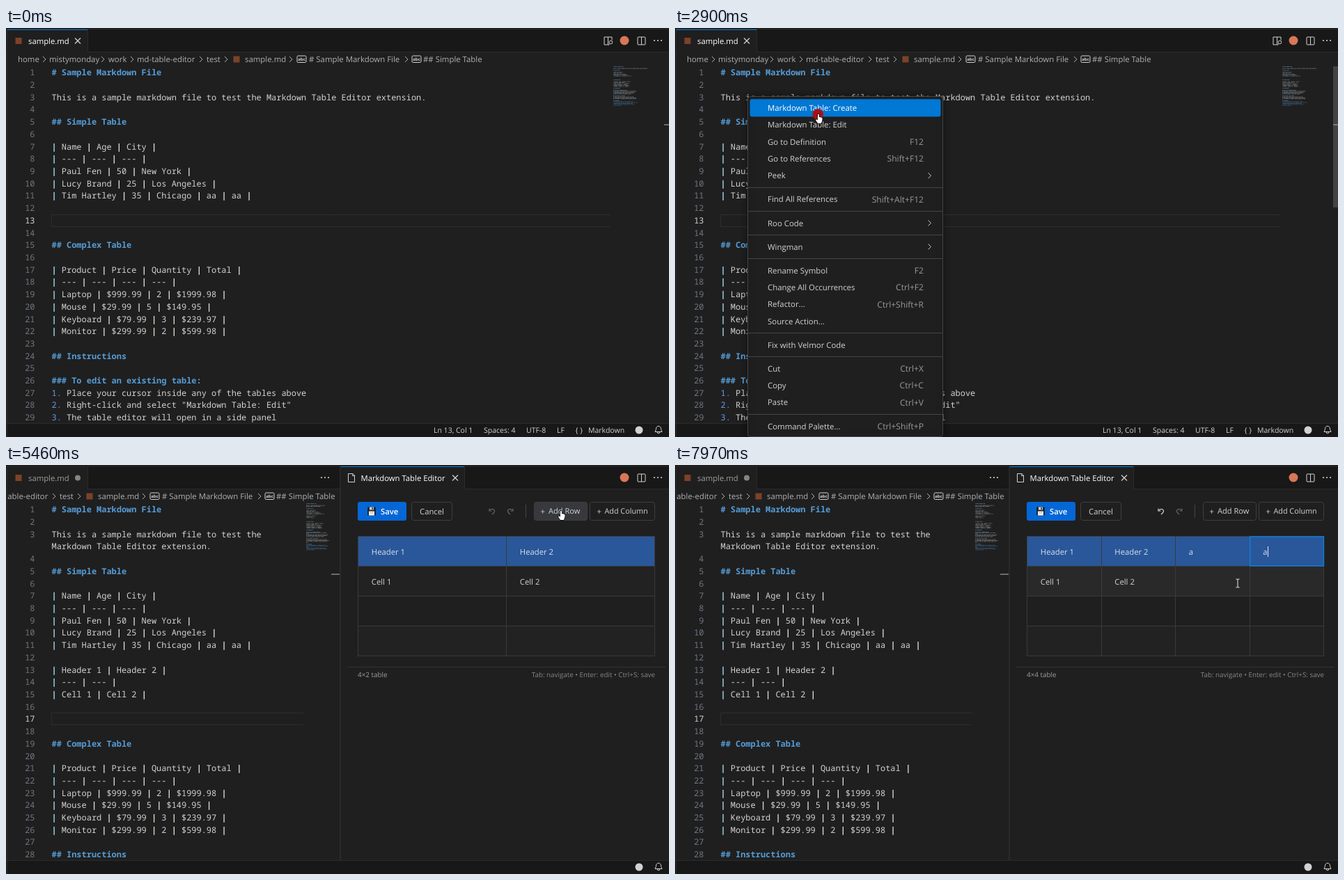
Write an HTML page with a canvas that moves like this. It is 952x588 px and loops after 8 s.

```html
<!DOCTYPE html>
<html lang="en">
<head>
<meta charset="utf-8">
<title>Markdown table editor</title>
<style>
html, body { margin: 0; width: 100%; height: 100%; overflow: hidden; background: #1f1f1f; }
canvas { display: block; }
</style>
</head>
<body>
<canvas id="stage" width="952" height="588"></canvas>
<script>
const W = 952, H = 588, LOOP = 8000;
const ctx = document.getElementById('stage').getContext('2d', { alpha: false });
const UI = '"Open Sans", "Noto Sans", sans-serif';
const MONO = '"Noto Sans Mono", "DejaVu Sans Mono", monospace';
const BG = '#1f1f1f', BAR = '#181818', LINE = '#2b2b2b', FG = '#d2d2d2', DIM = '#9d9d9d';
const CHAR = 7.18, ROW = 17.71, CODE_X = 65.5;

// moments of the story
const T = { enter: 930, press: 1950, menu: 2080, pick: 2900, menuOff: 2980, insert: 3030,
  split: 3100, load: 3310, crumbs: 3630, rows: [5190, 5460], cols: [5950, 6150],
  focus3: 7090, type3: 7360, focus4: 7560, type4: 7760 };
const clicks = [[T.press, T.menu], [T.pick, T.menuOff],
  ...[5130, 5400, 5890, 6090, T.focus3].map(t => [t, t + 60])];

const path = [[930, 54, 545], [1130, 60, 440], [1330, 84, 335], [1530, 101, 284], [1670, 104, 277],
  [1750, 104.5, 277], [2350, 104.5, 277], [2420, 112, 265], [2490, 129, 246], [2620, 180, 160],
  [2700, 202, 130], [2760, 206, 124], [3560, 206, 124], [3640, 330, 175], [3740, 540, 238],
  [3830, 588, 253], [4040, 588, 253], [4200, 604, 215], [4380, 662, 140], [4560, 810, 112],
  [4680, 848, 98], [4800, 830, 88], [4900, 805, 68], [5000, 797, 66], [5560, 797, 66],
  [5700, 832, 68], [5820, 857, 66], [6340, 857, 66], [6480, 835, 100], [6680, 793, 156],
  [6850, 796, 150], [7040, 800, 141], [7830, 800, 141], [7900, 804, 160], [7970, 808, 170]];

const doc = `# Sample Markdown File

This is a sample markdown file to test the Markdown Table Editor extension.

## Simple Table

| Name | Age | City |
| --- | --- | --- |
| Paul Fen | 50 | New York |
| Lucy Brand | 25 | Los Angeles |
| Tim Hartley | 35 | Chicago | aa | aa |



## Complex Table

| Product | Price | Quantity | Total |
| --- | --- | --- | --- |
| Laptop | $999.99 | 2 | $1999.98 |
| Mouse | $29.99 | 5 | $149.95 |
| Keyboard | $79.99 | 3 | $239.97 |
| Monitor | $299.99 | 2 | $599.98 |

## Instructions

### To edit an existing table:
1. Place your cursor inside any of the tables above
2. Right-click and select "Markdown Table: Edit"
3. The table editor will open in a side panel
4. Edit the cells and save your changes

### To create a new table:
1. Place your cursor where you want the table
2. Right-click and select "Markdown Table: Create"
3. A new table is inserted and the editor will open

### Features:
- Edit cells directly in a simple table view
- Add and remove the rows or columns of any table here
- Navigate with Tab and Enter between cells
- Undo and redo every change made to the table
- Save with Ctrl+S`.split('\n');
const added = ['| Header 1 | Header 2 |', '| --- | --- |', '| Cell 1 | Cell 2 |', ''];
const docNew = [...doc.slice(0, 12), ...added, ...doc.slice(12)];

const menu = [['Markdown Table: Create'], ['Markdown Table: Edit'], ['Go to Definition', 'F12'],
  ['Go to References', 'Shift+F12'], ['Peek', '>'], 0, ['Find All References', 'Shift+Alt+F12'], 0,
  ['Roo Code', '>'], 0, ['Wingman', '>'], 0, ['Rename Symbol', 'F2'],
  ['Change All Occurrences', 'Ctrl+F2'], ['Refactor...', 'Ctrl+Shift+R'], ['Source Action...'], 0,
  ['Fix with Velmor Code'], 0, ['Cut', 'Ctrl+X'], ['Copy', 'Ctrl+C'], ['Paste', 'Ctrl+V'], 0,
  ['Command Palette...', 'Ctrl+Shift+P']];

function rect(x, y, w, h, color) {
  ctx.fillStyle = color;
  ctx.fillRect(x, y, w, h);
}
function box(x, y, w, h, r, fill, stroke) {
  ctx.beginPath();
  ctx.roundRect(x, y, w, h, r);
  if (fill) { ctx.fillStyle = fill; ctx.fill(); }
  if (stroke) { ctx.strokeStyle = stroke; ctx.lineWidth = 1; ctx.stroke(); }
}
function line(color, width, ...pts) {
  ctx.beginPath();
  for (let i = 0; i < pts.length; i += 2) ctx.lineTo(pts[i], pts[i + 1]);
  ctx.strokeStyle = color;
  ctx.lineWidth = width;
  ctx.stroke();
}
function disc(x, y, r, color) {
  ctx.beginPath();
  ctx.arc(x, y, r, 0, 7);
  ctx.fillStyle = color;
  ctx.fill();
}
// y is the middle of the capitals
function text(s, x, y, color = FG, size = 11.3, align = 'left', font = UI, weight = 400) {
  ctx.font = `${weight} ${size}px ${font}`;
  ctx.textAlign = align;
  ctx.fillStyle = color;
  ctx.fillText(s, x, Math.round(y + size * 0.36));
}
function clip(x, y, w, h, draw) {
  ctx.save();
  ctx.beginPath();
  ctx.rect(x, y, w, h);
  ctx.clip();
  draw();
  ctx.restore();
}
const chevron = (x, y, color) => line(color, 1, x - 2, y - 4, x + 2, y, x - 2, y + 4);
const cross = (x, y) => { line(FG, 1.2, x - 4, y - 4, x + 4, y + 4); line(FG, 1.2, x + 4, y - 4, x - 4, y + 4); };
const dots = (x, y) => [-5, 0, 5].forEach(d => disc(x + d, y, 1.1, FG));
const mdIcon = (x, y) => rect(x - 4.5, y - 4.5, 9, 9, '#7d4228');
const span = (t, a, b) => Math.min(1, Math.max(0, (t - a) / (b - a)));

function splitIcon(x, y) {
  box(x - 5.5, y - 5.5, 11, 11, 1, null, FG);
  line(FG, 1, x, y - 5.5, x, y + 5.5);
}
function previewIcon(x, y) {
  line(FG, 1, x, y + 5.5, x - 5.5, y + 5.5, x - 5.5, y - 5.5, x + 5.5, y - 5.5, x + 5.5, y - 1);
  line(FG, 1, x, y - 5.5, x, y + 5.5);
  ctx.beginPath();
  ctx.arc(x + 4, y + 2, 2.3, 0, 7);
  ctx.stroke();
  line(FG, 1, x + 2.5, y + 4, x + 0.5, y + 6.5);
}
function bell(x, y) {
  ctx.beginPath();
  ctx.moveTo(x - 5, y + 3);
  ctx.lineTo(x - 3.7, y);
  ctx.bezierCurveTo(x - 4, y - 7, x + 4, y - 7, x + 3.7, y);
  ctx.lineTo(x + 5, y + 3);
  ctx.closePath();
  ctx.strokeStyle = FG;
  ctx.lineWidth = 1;
  ctx.stroke();
  ctx.beginPath();
  ctx.arc(x, y + 3.5, 1.8, 0, Math.PI);
  ctx.stroke();
}
function abcIcon(x, y) {
  box(x - 6.5, y - 5, 13, 9.5, 1.5, null, FG);
  text('abc', x, y, FG, 6, 'center', UI, 700);
}
function turnIcon(x, y, dir, color) {
  ctx.save();
  ctx.translate(x, y);
  ctx.scale(dir, 1);
  line(color, 1.1, -4, -4, -4, -0.5, -0.5, -0.5);
  ctx.beginPath();
  ctx.moveTo(-4, -0.5);
  ctx.bezierCurveTo(-1, -5, 4, -3, 3.5, 0.5);
  ctx.quadraticCurveTo(3, 2, 0, 4.5);
  ctx.stroke();
  ctx.restore();
}

// lines broken at spaces to fit the pane
function wrap(lines, cols) {
  const rows = [];
  lines.forEach((s, i) => {
    let n = i + 1;
    while (s.length > cols) {
      const cut = s.lastIndexOf(' ', cols);
      rows.push({ s: s.slice(0, cut), n });
      s = s.slice(cut + 1);
      n = 0;
    }
    rows.push({ s, n });
  });
  return rows;
}

function codeRow(s, y) {
  const put = (part, col, color, weight) =>
    text(part, CODE_X + col * CHAR, y, color, CHAR / 0.6, 'left', MONO, weight);
  if (s[0] === '#') return put(s, 0, '#569cd6', 700);
  const mark = (/^(\d\.|-)/.exec(s) || [''])[0];
  if (mark) put(mark, 0, '#6796e6', 500);
  put(s.slice(mark.length).replaceAll('|', ' '), mark.length, FG, 500);
  for (const { index } of s.matchAll(/\|/g)) put('|', index, index ? '#dedbd0' : '#a8def8', 700);
}

function minimap(rows, x) {
  rows.forEach(({ s }, i) => {
    const color = s[0] === '#' || s[0] === '-' ? '#569cd6' : FG;
    ctx.globalAlpha = s[0] === '#' ? 0.6 : 0.42;
    for (const m of s.matchAll(/\S+/g))
      rect(x + m.index * 0.65, 55 + i * 1.36, m[0].length * 0.65, 0.9, color);
  });
  ctx.globalAlpha = 1;
}

function breadcrumbs(shift) {
  const y = 45, c = '#b0b0b0';
  ctx.save();
  ctx.translate(-shift, 0);
  [['home', 17], ['mistymonday', 62], ['work', 147], ['md-table-editor', 188], ['test', 288],
    ['sample.md', 343], ['# Sample Markdown File', 435], ['## Simple Table', 599]]
    .forEach(([s, x]) => text(s, x, y, c, 11.4));
  [55, 139, 181, 280, 316, 409, 575].forEach(x => chevron(x, y, c));
  mdIcon(331, y);
  abcIcon(424.5, y);
  abcIcon(589.5, y);
  ctx.restore();
}

function editor(t) {
  const split = t >= T.split, changed = t >= T.insert;
  const right = split ? 479 : W, edge = split ? 427 : 868, active = changed ? 17 : 13;
  const rows = wrap(changed ? docNew : doc, split ? 50 : 100);
  clip(2, 36, right - 2, 20, () => breadcrumbs(t >= T.crumbs ? 211 : 0));
  clip(0, 54, right, 514, () => {
    rows.slice(0, 30).forEach(({ s, n }, i) => {
      const y = 64 + i * ROW;
      if (n === active) {
        const top = Math.round(y - 9) + 0.5;
        line('#2e2e2e', 1, edge, top, 65.5, top, 65.5, top + 17, edge, top + 17);
      }
      if (n) text(n, 41.5, y, n === active ? FG : '#6e7681', CHAR / 0.6, 'right', MONO);
      codeRow(s, y);
    });
  });
  minimap(rows, split ? 431 : 872);
  // scrollbar and overview mark
  const bar = split ? 467 : 945, barH = split ? 174 : 203;
  let show = span(t, T.enter, T.enter + 150);
  if (t > 3600) show = t < 3850 ? 1 - 0.88 * span(t, 3600, 3850) : 0.12 * (1 - span(t, 4300, 4800));
  ctx.globalAlpha = show;
  rect(bar, 55, right - bar, barH, '#434343');
  ctx.globalAlpha = 1;
  rect(bar, split ? 156.5 : 138.5, right - bar, 1.2, '#a0a0a0');
}

function chrome(t) {
  const split = t >= T.split;
  rect(0, 0, W, 35, BAR);
  rect(0, 34, W, 1, LINE);
  rect(2, 2, 115, 33, BG);
  rect(117, 2, 1, 33, LINE);
  rect(1, 1, W, 1, LINE);
  if (!split) rect(2, 2, 115, 1, '#0078d4');
  mdIcon(18, 18.5);
  text('sample.md', 32, 18.5, split ? DIM : '#ffffff');
  if (t >= T.insert) disc(103, 18.5, 4, split ? '#858585' : FG);
  else cross(103, 18.5);
  if (split) {
    dots(458, 18);
    rect(481, 2, 177, 33, BG);
    rect(481, 2, 177, 1, '#0078d4');
    rect(658, 2, 1, 33, LINE);
    line(FG, 1, 498, 12.5, 491.5, 12.5, 491.5, 24.5, 500.5, 24.5, 500.5, 15, 498, 12.5, 497.5, 15.5, 500.5, 15.5);
    text('Markdown Table Editor', 509.5, 18.5, '#ffffff');
    cross(645, 18.5);
    rect(479.5, 2, 1.2, 566, '#333333');
  } else previewIcon(864.5, 18.5);
  disc(888, 18, 6.5, '#d97757');
  splitIcon(912.5, 18.5);
  dots(936, 18);
  rect(0, 568, W, 20, BAR);
  rect(0, 568, W, 1, LINE);
  rect(1, 1, 1, 587, LINE);
  if (!split) {
    const col = t >= T.insert ? 'Ln 17, Col 1' : 'Ln 13, Col 1';
    [[col, 614], ['Spaces: 4', 686], ['UTF-8', 747], ['LF', 791], ['{ }', 817.5], ['Markdown', 836]]
      .forEach(([s, x]) => text(s, x, 578.5, FG, 10.5));
  }
  disc(909, 578, 5.5, FG);
  bell(937, 577.5);
}

function floppy(x, y) {
  box(x, y, 12, 12, 1, '#20242c');
  rect(x + 3, y, 6, 4, '#c9d4e4');
  rect(x + 6.5, y + 0.7, 1.5, 2.6, '#20242c');
  rect(x + 2, y + 6, 8, 6, '#f2f2f2');
  rect(x + 3, y + 8, 6, 0.8, '#9aa4b2');
}

function panel(t, m) {
  const count = list => 2 + list.filter(at => t >= at).length;
  const nr = count(T.rows), nc = count(T.cols);
  const over = (x, w) => m && m.y > 53 && m.y < 80 && m.x > x && m.x < x + w;
  const button = (x, w) => box(x + 0.5, 53.5, w - 1, 26, 3, over(x, w) ? '#37393d' : null, '#3f3f3f');
  box(505, 53, 70, 27, 3, '#0567d6');
  floppy(519, 60.5);
  text('Save', 538, 66.5, '#ffffff', 11.3, 'left', UI, 600);
  button(582, 59);
  text('Cancel', 594, 66.5);
  button(758, 77);
  text('+', 767.5, 66.5);
  text('Add Row', 779, 66.5, FG, 11.1);
  button(838, 94);
  text('+', 848.5, 66.5);
  text('Add Column', 859.5, 66.5, FG, 10.8);
  turnIcon(698, 66.5, 1, t >= T.type3 ? FG : '#666666');
  turnIcon(724, 66.5, -1, '#666666');
  rect(746, 57, 1, 19, '#454545');

  const x0 = 505.5, y0 = 102.5, cw = 426 / nc, rh = 43, bottom = y0 + nr * rh;
  const hover = m && m.x > x0 && m.x < 931 ? Math.floor((m.y - y0) / rh) : -1;
  for (let r = 0; r < nr; r++) {
    const fill = r === 0 ? '#2a579a' : r === hover ? '#292929' : r % 2 ? '#222222' : BG;
    rect(x0, y0 + r * rh, 426, rh, fill);
  }
  for (let r = 0; r <= nr; r++) line('#3a3a3a', 1, x0, y0 + r * rh, 931.5, y0 + r * rh);
  for (let c = 0; c <= nc; c++) {
    const x = Math.round(x0 + c * cw - 0.5) + 0.5;
    line('#3a3a3a', 1, x, y0, x, bottom);
  }
  const cellX = c => x0 + c * cw + 19.3;
  const head = ['Header 1', 'Header 2', t >= T.type3 ? 'a' : '', t >= T.type4 ? 'a' : ''];
  head.slice(0, nc).forEach((s, c) => text(s, cellX(c), 125, '#d8dfea'));
  text('Cell 1', cellX(0), 167.5);
  text('Cell 2', cellX(1), 167.5);

  // focused header cell with a blinking caret
  const [at, cell] = t >= T.focus4 ? [T.type4, 3] : t >= T.focus3 ? [T.type3, 2]
    : t < 5130 ? [T.load, 0] : [0, -1];
  if (cell >= 0) {
    const x = Math.round(x0 + cell * cw - 0.5);
    ctx.strokeStyle = '#0a84e0';
    ctx.lineWidth = 1.3;
    ctx.strokeRect(x + 0.7, 102.9, cw - 0.7, 42.2);
    if (t < at || Math.floor((t - at) / 500) % 2 === 0) {
      ctx.font = `11.3px ${UI}`;
      rect(Math.round(cellX(cell) + ctx.measureText(head[cell]).width), 117, 1, 15, '#e6e6e6');
    }
  }
  rect(490, bottom + 15.5, 457, 1, '#333333');
  text(`${nr}×${nc} table`, 505, bottom + 27, DIM, 9.9);
  text('Tab: navigate • Enter: edit • Ctrl+S: save', 932, bottom + 27, '#858585', 9.8, 'right');
}

function contextMenu(m) {
  ctx.save();
  ctx.shadowColor = 'rgba(0,0,0,0.45)';
  ctx.shadowBlur = 8;
  box(104.5, 98.5, 280, 489, 4, BG, '#454545');
  ctx.restore();
  let y = 115;
  menu.forEach(item => {
    if (!item) {
      rect(105, Math.floor(y - 7.3), 279, 1, '#454545');
      y += 9.8;
      return;
    }
    const [label, key] = item;
    const on = m.x > 108 && Math.abs(m.y - y) < 12.2;
    if (on) box(107.5, y - 12.8, 274, 25.4, 3, '#0078d4');
    text(label, 133, y, on ? '#ffffff' : FG, 11.4);
    if (key === '>') chevron(365.5, y, FG);
    else if (key) text(key, 357, y, on ? '#ffffff' : '#999999', 12.1, 'right');
    y += 24.3;
  });
}

function mouseAt(t) {
  if (t < T.enter) return null;
  const i = path.findIndex(p => p[0] > t);
  if (i < 0) return { x: 808, y: 170 };
  const [ta, xa, ya] = path[i - 1], [tb, xb, yb] = path[i], k = (t - ta) / (tb - ta);
  return { x: xa + (xb - xa) * k, y: ya + (yb - ya) * k };
}

function cursorKind(t, { x, y }) {
  if (t >= T.menu && t < T.menuOff) return 'hand';
  if (t < T.pick) return x > 62 ? 'beam' : 'arrow';
  if (x < 480) return t > 3560 && x < 427 ? 'beam' : 'arrow';
  if (y < 80 && y > 53 && x > 758) return 'hand';
  return y > 146 && y < 188 ? 'beam' : 'arrow';
}

function shape(pts) {
  ctx.beginPath();
  for (let i = 0; i < pts.length; i += 2) ctx.lineTo(pts[i], pts[i + 1]);
  ctx.closePath();
  ctx.strokeStyle = '#000000';
  ctx.lineWidth = 1.4;
  ctx.stroke();
  ctx.fillStyle = '#ffffff';
  ctx.fill();
}

function pointer(t, m) {
  if (clicks.some(([a, b]) => t >= a && t < b)) disc(m.x - 0.8, m.y, 7.8, '#aa1016');
  ctx.save();
  ctx.translate(m.x, m.y);
  const kind = cursorKind(t, m);
  if (kind === 'beam') {
    line('#e8e8e8', 1, 0, -5, 0, 5);
    line('#e8e8e8', 1, -2.5, -6, -0.7, -6, 0, -5, 0.7, -6, 2.5, -6);
    line('#e8e8e8', 1, -2.5, 6, -0.7, 6, 0, 5, 0.7, 6, 2.5, 6);
  } else if (kind === 'hand') {
    shape([-1, 0, 0.8, 0, 1, 4, 4, 4.6, 5.6, 5.6, 5.4, 9, 4, 13, -1, 13, -4, 8.5, -3.4, 7.2, -1.2, 8.5]);
  } else {
    shape([0, 0, 0, 10, 2.3, 8, 3.8, 11.4, 5.3, 10.7, 3.9, 7.4, 7, 7.2]);
  }
  ctx.restore();
}

function frame(now) {
  const t = now % LOOP, m = mouseAt(t);
  ctx.textRendering = 'geometricPrecision';
  rect(0, 0, W, H, BG);
  editor(t);
  chrome(t);
  if (t >= T.load) panel(t, m);
  if (t >= T.menu && t < T.menuOff) contextMenu(m);
  if (m) pointer(t, m);
  requestAnimationFrame(frame);
}
requestAnimationFrame(frame);
</script>
</body>
</html>
```
